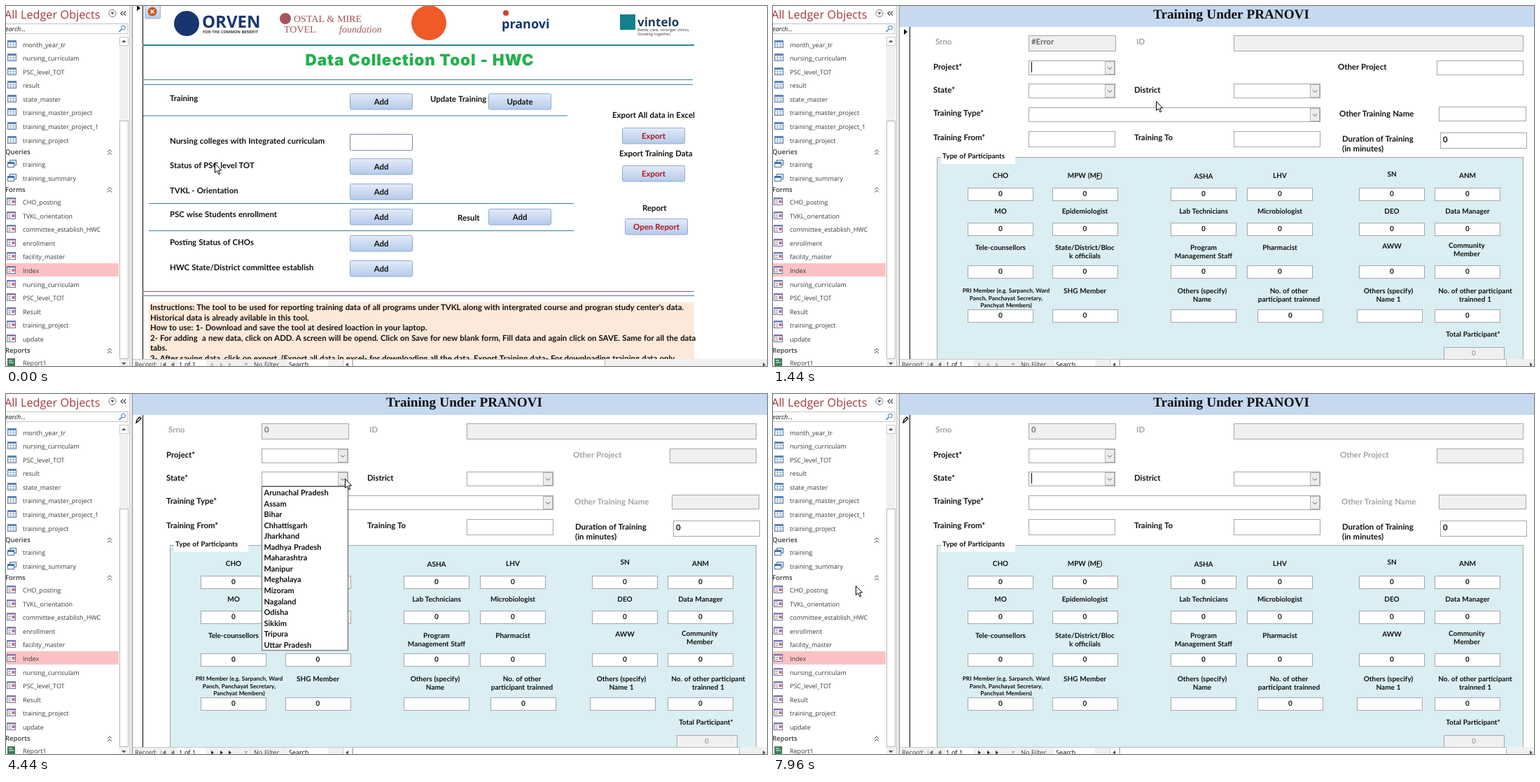
An HTML page for the animation above (8 s loop, 1087x515 px).

```html
<!DOCTYPE html>
<html lang="en">
<head>
<meta charset="utf-8">
<title>Data Collection Tool</title>
<style>
html, body { margin: 0; width: 100%; height: 100%; overflow: hidden; background: #fff; }
svg { display: block; }
text { font: 700 11.4px Lato, sans-serif; word-spacing: .4px; fill: #111; white-space: pre; text-rendering: geometricPrecision; }
.mid { text-anchor: middle; }
.dim { fill: #a3a3a3; }
.red { fill: #b3151c; }
.small { font-size: 10px; }
.tiny { font-size: 8.3px; }
.item { font-size: 11px; }
.nav { font: 400 9px "Open Sans", sans-serif; fill: #3a3a3a; }
.head { font: 600 9.5px "Open Sans", sans-serif; fill: #3a3a3a; }
.pane { font: 400 16.2px "Open Sans", sans-serif; fill: #a4373a; }
.hunt { font: italic 400 9px "Open Sans", sans-serif; }
.title { font: 900 22.5px Inter, sans-serif; letter-spacing: .9px; fill: #22b14c; }
.banner { font: 700 19.2px "Liberation Serif", serif; }
.serif { font: 400 14px "Liberation Serif", serif; fill: #a5545c; }
.word { font: 700 24px "Open Sans", sans-serif; fill: #17366f; }
.tag { font: 400 5.7px "Open Sans", sans-serif; fill: #333; }
</style>
</head>
<body>
<script>
const LOOP = 8000, TEAL = '#31859c', EDGE = '#a6a6a6', GREY = '#f0f0f0';

const text = (x, y, s, cls = '', more = '') => `<text x="${x}" y="${y}" class="${cls}" ${more}>${s}</text>`;
const rect = (x, y, w, h, fill, stroke = 'none', more = '') =>
  `<rect x="${x}" y="${y}" width="${w}" height="${h}" fill="${fill}" stroke="${stroke}" ${more}/>`;
const path = (d, fill, stroke = 'none', more = '') => `<path d="${d}" fill="${fill}" stroke="${stroke}" ${more}/>`;
const dot = (x, y, r, fill) => `<circle cx="${x}" cy="${y}" r="${r}" fill="${fill}"/>`;
const group = (id, body) => `<g id="${id}">${body}</g>`;
const lines = (x, y, step, s, cls) => s.split('|').map((l, i) => text(x, y + i * step, l, cls)).join('');
const rule = (x1, x2, y, h = 1) => rect(x1, y, x2 - x1, h, TEAL);
const field = (x, y, w, h, fill = '#fff') => rect(x + .5, y + .5, w - 1, h - 1, fill, EDGE);
const combo = (x, y, w, h) => field(x, y, w, h) + rect(x + w - 14.5, y + 1.5, 13, h - 3, '#ececec', '#b5b5b5') +
  path(`M${x + w - 11} ${y + h / 2 - 1}l3 3 3-3`, 'none', '#555');
const button = (x, y, s, cls = '', w = 90) =>
  rect(x + .5, y + .5, w - 1, 22.5, 'url(#sky)', '#8faad2', 'rx="2"') + text(x + w / 2, y + 16, s, 'mid ' + cls);

// Navigation pane
const icons = {
  table: y => rect(2.5, y - 5.5, 12, 10, '#fff', '#5b7fa8') + rect(2, y - 6, 13, 3, '#5b86b8') +
    path(`M3 ${y - .5}h11M3 ${y + 2.5}h11M6.5 ${y - 3}v7M10.5 ${y - 3}v7`, 'none', '#8fabca', 'stroke-width=".8"'),
  query: y => rect(5.5, y - 5.5, 9, 7, '#e4eefa', '#456f9f') + rect(2.5, y - 2.5, 9, 7, '#fff', '#456f9f') +
    rect(2, y - 3, 10, 3, '#3f73ae'),
  form: y => rect(1.5, y - 5.5, 12, 10, '#fff', '#6a6fa0') + rect(1, y - 6, 13, 2.5, '#7479b0') +
    path(`M3 ${y - 1}h4M3 ${y + 2}h4`, 'none', '#777') + rect(8.5, y - 2, 4, 4, '#c56b78'),
  report: y => rect(2, y - 6, 11, 12, '#3f7d58') + path(`M4 ${y - 3}h5M4 ${y}h7`, 'none', '#fff')
};
const sections = [
  ['', 'table', 'month_year_tr nursing_curriculam PSC_level_TOT result state_master training_master_project training_master_project_1 training_project'],
  ['Queries', 'query', 'training training_summary'],
  ['Forms', 'form', 'CHO_posting TVKL_orientation committee_establish_HWC enrollment facility_master Index nursing_curriculam PSC_level_TOT Result training_project update'],
  ['Reports', 'report', 'Report1']
];
function sidebar() {
  let out = rect(0, 0, 181, 515, '#fff'), y = 54.5;
  for (const [name, icon, items] of sections) {
    if (name) {
      out += text(-1, y + 3.5, name, 'head') +
        path(`M145 ${y}l3-3 3 3M145 ${y + 4}l3-3 3 3`, 'none', '#444');
      y += 17.3;
    }
    for (const s of items.split(' ')) {
      const mid = Math.round(y);
      if (s === 'Index') out += rect(0, mid - 10, 161, 19, '#fcc2c3');
      out += icons[icon](mid) + text(24, mid + 3.5, s, 'nav');
      y += 19.6;
    }
    y -= 2.6;
  }
  return out + text(-2, 17.5, 'All Ledger Objects', 'pane') +
    `<circle cx="152" cy="10.500" r="5" fill="none" stroke="#777"/>` + path('M149.500 9h5l-2.500 3.500z', '#555') +
    path('M167 7.500l-3 3 3 3M171 7.500l-3 3 3 3', 'none', '#444', 'stroke-width="1.200"') +
    rect(-1, 25.5, 175, 14, 'none', '#c4c4c4') + text(-1, 36, 'earch...', 'hunt') +
    `<circle cx="167.500" cy="31" r="3" fill="none" stroke="#3b78b5"/>` + path('M165 33.500l-3.500 3.500', 'none', '#3b78b5', 'stroke-width="1.500"') +
    rect(162, 44, 13, 471, GREY) + rect(162.5, 44.5, 12, 12, '#fff', '#c8c8c8') + rect(162.5, 164.5, 12, 340, '#fff', '#b8b8b8') +
    path('M165 52h6.500l-3.200-3.500zM165 510h6.500l-3.200 3.500z', '#555') +
    rect(176, 0, 5, 515, '#ececec') + rect(176, 0, 1, 515, '#c8c8c8') + rect(180, 0, 1, 515, '#8c8c8c');
}

const recordBar = () => rect(181, 505, 299, 10, GREY) + rect(181, 505, 299, 1, '#c8c8c8') +
  text(184, 516, 'Record:', 'nav') + path('M221.500 510v5M228 510v6l-4-3zM240 510v6l-4-3z', '#777', '#777', 'stroke-width=".700"') +
  rect(246, 506, 40, 9, '#fff') + text(247, 516, '1 of 1', 'nav', 'style="fill:#000"') +
  `<g id="next" stroke-width=".700">${path('M293 510v6l4-3zM306 510v6l4-3zM311.500 510v5M318 510v6l4-3z', 'inherit')}</g>` +
  path('M340 511h6l-2.500 2.500v2h-1v-2z', '#aaa') + text(354, 516, 'No Filter', 'nav dim') +
  rect(402, 506, 58, 9, '#fff') + text(404, 516, 'Search', 'nav', 'style="fill:#000"');
const slider = end => rect(480, 505, 607, 10, GREY) + rect(481.5, 505.5, 13, 12, '#fff', '#c8c8c8') +
  path('M489 510v6l-4-3z', '#555') + rect(495.5, 505.5, end - 495, 12, '#fff', '#b8b8b8') + path('M1081 510v6l4-3z', '#555');

// Start screen
const logos = dot(258, 25, 18, '#17366f') + text(280, 31, 'ORVEN', 'word') + text(281, 39, 'FOR THE COMMON BENEFIT', 'tag', 'style="font-weight:700"') +
  dot(399, 18, 8, '#a5545c') + text(411, 23, 'OSTAL &amp; MIRE', 'serif') + text(397, 38, 'TOVEL', 'serif') +
  text(476, 38, 'foundation', 'serif', 'style="font-style:italic"') +
  dot(604, 24, 25, '#ef5a28') +
  dot(714, 10, 4, '#d0402b') + text(708, 32, 'pranovi', 'word', 'style="font-size:18px"') +
  rect(877, 12, 22, 22, '#13808f') + text(902, 29, 'vintelo', 'word', 'style="font-size:17px;fill:#1d3c55"') +
  text(902, 36, 'Better care, stronger clinics.', 'tag') + text(902, 42, 'Growing together.', 'tag');

function startScreen() {
  const rows = [[136, 125, 'Training'], [197, 183, 'Nursing colleges with Integrated curriculam'],
    [232, 218, 'Status of PSC level TOT'], [268, 254, 'TVKL - Orientation'], [302, 290, 'PSC wise Students enrollment'],
    [342, 328, 'Posting Status of CHOs'], [378, 364, 'HWC State/District committee establish']];
  return rect(181, 0, 906, 515, '#fff') + rect(195, 0, 1, 505, '#000') + path('M187-1v8l5-4z', '#000') +
    rect(198.5, -2, 22, 20, 'url(#sky)', '#9db3d3', 'rx="2"') + dot(209, 8, 6.5, '#c35a26') +
    path('M206.500 5.500l5 5M211.500 5.500l-5 5', 'none', '#fff', 'stroke-width="1.600"') + logos +
    rule(195, 983, 55, 2) + rule(195, 981, 105) + rule(195, 981, 112) + rule(196, 802, 156.5) +
    rule(204, 811, 282) + rule(204, 811, 321) + rule(195, 983, 408) + rule(195, 983, 414) +
    text(591, 85, 'Data Collection Tool - HWC', 'title mid') +
    rows.map(([y, top, s]) => text(234, y, s) + button(491, top, 'Add')).join('') +
    text(606, 137, 'Update Training') + button(689, 125, 'Update') + text(645, 307, 'Result') + button(689, 290, 'Add') +
    text(866, 160, 'Export All data in Excel') + button(880, 174, 'Export', 'red') +
    text(876, 215, 'Export Training Data') + button(880, 228, 'Export', 'red') +
    text(909, 293, 'Report') + button(884, 304, 'Open Report', 'red') +
    rect(204, 424, 779, 81, '#fde9d9') +
    lines(206, 435, 14.6, "Instructions: The tool to be used for reporting training data of all programs under TVKL along with intergrated course and progran study center's data.|Historical data is already avilable in this tool.|How to use: 1- Download and save the tool at desired loaction in your laptop.|2- For adding  a new data, click on ADD. A screen will be opend. Click on Save for new blank form, Fill data and again click on SAVE. Same for all the data|tabs.|3- After saving data, click on export, (Export all data in excel- for downloading all the data, Export Training data- For downloading training data only") +
    group('blank', rect(491.5, 183.5, 89, 23, '#fff', '#456', 'rx="2" stroke-dasharray="1.500 1"')) +
    group('focus', rect(491.5, 125.5, 89, 22.5, 'none', '#223', 'rx="2" stroke-dasharray="1.500 1"')) +
    group('wipe', rect(427, 62, 46, 16, '#fff')) + rect(480, 505, 607, 10, '#fff') + group('startSlider', slider(855));
}

// Training form
const columns = [325, 445.5, 615, 724, 884, 992];
// Each row: label y, box y, then cells of label, label shift x, label shift y, box shift x, box value
const cells = [
  [246, 260, ['CHO'], ['MPW (M<tspan text-decoration="underline">F</tspan>)'], ['ASHA', 0, 1], ['LHV'], ['SN', 0, -2.5], ['ANM']],
  [297, 310, ['MO'], ['Epidemiologist'], ['Lab Technicians'], ['Microbiologist'], ['DEO'], ['Data Manager']],
  [349, 371, ['Tele-counsellors'], ['State/District/Bloc|k officiials'], ['Program|Management Staff'], ['Pharmacist'], ['AWW', 0, -2], ['Community|Member', -1, -3]],
  [411, 434, ['PRI Member (e.g. Sarpanch, Ward|Panch, Panchayat Secretary,|Panchyat Members)', 8, -1], ['SHG Member'],
    ['Others (specify)|Name', -2, 0, 0, ''], ['No. of other|participant trainned', 13, 0, 15], ['Others (specify)|Name 1', -5, 0, -3, ''], ['No. of other participant|trainned 1', 11]]
];
const grid = () => cells.map(([ly, by, ...row]) => row.map(([s, dx = 0, dy = 0, bx = 0, v = '0'], i) => {
  const x = columns[i], tiny = s.startsWith('PRI');
  return lines(x + dx, ly + dy, tiny ? 10.5 : 12, s, 'mid ' + (tiny ? 'tiny' : 'small')) +
    field(Math.round(x + bx - 47), by, 94, 19) + text(x + bx, by + 12, v, 'mid small');
}).join('')).join('');

function list(id, y, items) {
  return group(id, rect(365.5, y + .5, 123, items.length * 15.55 + 1, '#fff', '#555') +
    items.map((s, i) => `<g>${rect(366, y + 1.5 + i * 15.55, 122, 15.5, 'none')}${text(368.5, y + 13 + i * 15.55, s, 'item')}</g>`).join(''));
}
const optional = (fill, cls, shift) => field(948, 78, 124, 21, fill) + text(807 + shift, 91, 'Other Project', cls) +
  field(951, 144, 125, 21, fill) + text(809 + shift, 157.5, 'Other Training Name', cls);

function formScreen() {
  return rect(181, 0, 906, 515, '#fff') + rect(181, 0, 906, 30, '#c6d9f1') + rect(195, 30, 1, 475, '#000') +
    text(654.5, 18, 'Training Under PRANOVI', 'banner mid') +
    text(232, 55, 'Srno', 'dim') + field(365, 42, 125, 23, GREY) + text(519, 55, 'ID', 'dim') + field(658, 42, 414, 23, GREY) +
    text(229, 91, 'Project*') + combo(365, 78, 124, 21) +
    text(229, 124, 'State*') + combo(365, 111, 124, 21) + text(516, 124, 'District') + combo(658, 111, 124, 21) +
    text(229, 157, 'Training Type*') + combo(365, 145, 417, 21) +
    text(229, 192, 'Training From*') + field(365, 179, 124, 23) + text(516, 192, 'Training To') + field(658, 179, 124, 23) +
    lines(813, 193.5, 14.5, 'Duration of Training|(in minutes)') + field(953, 181, 124, 23) + text(957, 194.5, '0') +
    rect(234.5, 216.5, 837, 300, '#daeef3', EDGE) + rect(240, 208, 106, 18, '#fff') + text(242, 218, 'Type of Participants', 'small') +
    grid() + text(1000, 472.5, 'Total Participant*', 'mid small') + field(958, 488, 87, 20, GREY) + text(1001, 500, '0', 'mid dim small') +
    group('idle', text(369, 55, '#Error', '', 'style="fill:#666"') + optional('#fff', '', 0) + path('M187 33v8l5-4z', '#000')) +
    group('edit', text(369, 55, '0', '', 'style="fill:#777"') + optional(GREY, 'dim', 3) +
      path('M186 41l1-4 4-4 2 2-4 4z', '#fff', '#000', 'stroke-width="1.300"')) +
    group('caret', rect(369, 0, 1, 15, '#000')) +
    list('projects', 98, 'TVKL-RDNQ,OZL,PRANOVI-TVKL,Others,Survillance,DUVO'.split(',')) +
    list('states', 132, 'Arunachal Pradesh,Assam,Bihar,Chhattisgarh,Jharkhand,Madhya Pradesh,Maharashtra,Manipur,Meghalaya,Mizoram,Nagaland,Odisha,Sikkim,Tripura,Uttar Pradesh'.split(',')) +
    slider(1047);
}

document.body.innerHTML = `<svg width="1087" height="515" viewBox="0 0 1087 515">
<defs><linearGradient id="sky" x2="0" y2="1"><stop stop-color="#e3ebf8"/><stop offset=".5" stop-color="#cbdaf1"/><stop offset="1" stop-color="#b5cbec"/></linearGradient></defs>
${group('start', startScreen())}${group('form', formScreen())}${recordBar()}${sidebar()}
${group('pointer', path('M.500.500V13.500l3-2.700 2.300 5 2-.900-2.200-4.900h4z', '#fff', '#000'))}</svg>`;

const el = id => document.getElementById(id);
const show = (id, on) => el(id).style.display = on ? '' : 'none';

// Pointer stops: time, x, y
const stops = [[500, 298, 225], [1300, 547, 136], [1900, 547, 136], [2120, 602, 95], [2400, 560, 54], [2680, 476, 83],
  [3100, 450, 150], [3330, 450, 150], [3560, 470, 121], [3770, 559, 103], [3850, 559, 103], [4100, 492, 117],
  [4320, 478, 119], [4650, 494, 125], [5109, 494, 125], [5110, 552, 112], [5450, 630, 150], [5640, 630, 150],
  [5720, 837, 317], [5979, 837, 317], [5980, 891, 368], [6300, 891, 368], [6301, 1058, 455], [6600, 1058, 455],
  [6601, 1044, 423], [7000, 1044, 423], [7140, 446, 337], [7630, 0, 280], [7880, 118, 274]];
const away = [[6050, 6400], [6470, 6730], [6880, 7140], [7630, 7890]];

function pointerAt(t) {
  const i = stops.findIndex(s => s[0] > t);
  if (i <= 0) return stops.at(i).slice(1);
  const [t0, x0, y0] = stops[i - 1], [t1, x1, y1] = stops[i], k = (t - t0) / (t1 - t0);
  return [x0 + (x1 - x0) * k, y0 + (y1 - y0) * k];
}

function draw(now) {
  const t = now % LOOP, edit = t >= 4030, form = t >= 1440;
  show('start', !form);
  show('form', form);
  show('blank', t < 70);
  show('focus', t >= 1300);
  show('wipe', t >= 1370);
  show('startSlider', t < 1370);
  show('idle', !edit);
  show('edit', edit);
  el('next').setAttribute('style', edit ? 'fill:#333' : 'fill:#b5b5b5');
  show('caret', Math.floor((t - 1430) / 535) % 2 === 0);
  el('caret').setAttribute('transform', `translate(0 ${t < 4250 ? 80 : 113})`);

  show('projects', t >= 2750 && !edit);
  const hover = Math.floor((pointerAt(Math.min(t, 3560))[1] - 99) / 15.55);
  [...el('projects').querySelectorAll('g')].forEach((g, i) => {
    g.firstChild.setAttribute('fill', i === hover ? '#000' : 'none');
    g.lastChild.style.fill = i === hover ? '#fff' : '';
  });
  show('states', t >= 4390 && t < 5180);

  const [x, y] = pointerAt(t).map(Math.round);
  show('pointer', !away.some(([a, b]) => t >= a && t < b));
  el('pointer').setAttribute('transform', `translate(${x} ${y})`);
}

const begin = performance.now();
function tick() {
  draw(performance.now() - begin);
  requestAnimationFrame(tick);
}
tick();
</script>
</body>
</html>
```
